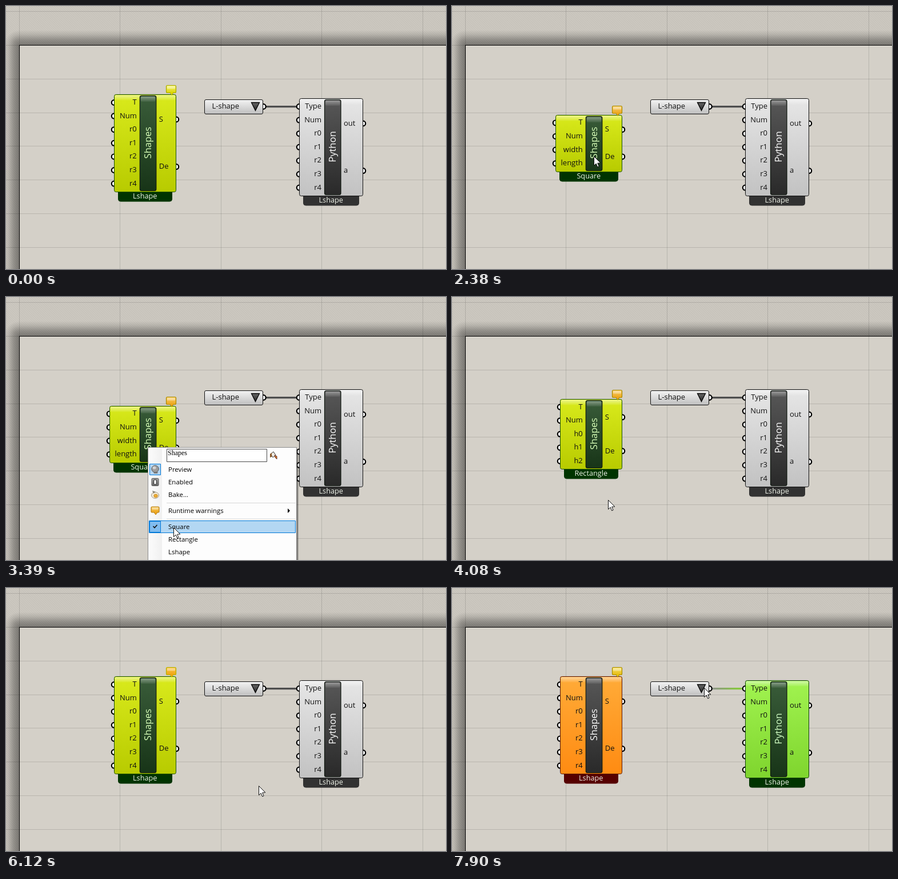
Animation, 770 px wide and 459 px high, one loop 8 s. Source, as an HTML page with a canvas:

```html
<!DOCTYPE html>
<html lang="en">
<head>
<meta charset="utf-8">
<title>Component shape menu</title>
<style>
html, body { margin: 0; width: 100%; height: 100%; overflow: hidden; background: #d4d0c8; }
canvas { display: block; }
</style>
</head>
<body>
<canvas id="stage" width="770" height="459"></canvas>
<script>
const W = 770, H = 459, LOOP = 8000;
const ctx = document.getElementById('stage').getContext('2d');
const SANS = '"Open Sans", "Noto Sans", sans-serif';
const SERIF = '"Liberation Serif", serif';

// Bursts of movement: start, end, number of steps
const BURSTS = [
  [140, 140, 1], [290, 830, 8], [980, 1760, 11], [1840, 2380, 8], [2700, 3460, 11],
  [3540, 3540, 1], [3770, 3770, 1], [3920, 4710, 11], [4800, 5100, 5], [5650, 5710, 2],
  [5960, 6730, 11], [6820, 6900, 2], [7050, 7050, 1], [7380, 7900, 8]
];
// Pointer path: time, x, y
const PATH = [
  [0, 661, 470], [139, 661, 470], [140, 661, 456], [290, 660, 446], [560, 430, 318],
  [830, 247, 236], [980, 247, 236], [1440, 307, 365], [1760, 308, 367], [1840, 308, 366],
  [2380, 248, 262], [2700, 248, 262], [3380, 293, 401], [3460, 297, 420], [3540, 296, 419],
  [3770, 287, 412], [3920, 287, 412], [4320, 251, 264], [4400, 251, 264], [4710, 293, 325],
  [4800, 301, 342], [5100, 326, 440], [5900, 326, 440], [6110, 441, 346], [6730, 566, 250],
  [6900, 577, 236], [7050, 567, 233], [7380, 606, 262], [7530, 757, 338], [7750, 520, 214],
  [7900, 441, 174]
];
// Context menus: open, close, x, y, checked item
const MENUS = [
  [980, 1840, 246, 235, 'Lshape'],
  [2700, 3920, 248, 262, 'Square'],
  [4400, 5650, 250, 263, 'Rectangle']
];
const ITEMS = [
  ['Preview', 39], ['Enabled', 61], ['Bake...', 83], ['Runtime warnings', 111],
  ['Square', 139], ['Rectangle', 161], ['Lshape', 183], ['Tshape', 205], ['Ushape', 227]
];
const RADII = ['r0', 'r1', 'r2', 'r3', 'r4'];
const SKINS = {
  lime: { body: ['#d9ea1c', '#b8cb00'], edge: '#1a5200', tag: ['#3a5d3a', '#173417'], foot: '#003400', text: '#d8ffb8' },
  orange: { body: ['#ffab38', '#ff8b12'], edge: '#5a1500', tag: ['#585858', '#292929'], foot: '#560000', text: '#fff' },
  grey: { body: ['#e6e6e6', '#c2c2c2'], edge: '#111', tag: ['#585858', '#292929'], foot: '#323232', text: '#fff' },
  green: { body: ['#a1f350', '#7fd52e'], edge: '#10400a', tag: ['#3a5d3a', '#173417'], foot: '#003400', text: '#d2ffc4' }
};
const BALLOONS = {
  yellow: ['#f4f27a', '#dcd600', '#a8a800'],
  orange: ['#f8cf6a', '#eda51c', '#a98b00'],
  mixed: ['#f8c44a', '#f0a412', '#b4b400'],
  gold: ['#f8e06a', '#e6bd10', '#a88d00']
};

// Holds each step of a burst; a step may start a little early
function stepTime(t) {
  let out = 0;
  for (const [a, b, n] of BURSTS) {
    if (t < a) break;
    if (t >= b) { out = b; continue; }
    const gap = (b - a) / (n - 1);
    out = a + Math.floor((t - a) / gap + 0.25) * gap;
  }
  return out;
}

function pointerAt(t) {
  const i = PATH.findIndex(p => p[0] > t);
  if (i < 0) return PATH[PATH.length - 1].slice(1);
  const [a, x, y] = PATH[i - 1], [b, u, v] = PATH[i];
  const k = (t - a) / (b - a);
  return [x + (u - x) * k, y + (v - y) * k];
}

function vert(y0, y1, colors) {
  const g = ctx.createLinearGradient(0, y0, 0, y1);
  colors.forEach((c, i) => g.addColorStop(i / (colors.length - 1), c));
  return g;
}

function box(x, y, w, h, r, fill, edge, line = 1) {
  ctx.beginPath();
  ctx.roundRect(x, y, w, h, r);
  if (fill) { ctx.fillStyle = fill; ctx.fill(); }
  if (edge) { ctx.strokeStyle = edge; ctx.lineWidth = line; ctx.stroke(); }
}

function shape(points, fill, edge, line = 1) {
  ctx.beginPath();
  points.forEach(([x, y]) => ctx.lineTo(x, y));
  ctx.closePath();
  if (fill) { ctx.fillStyle = fill; ctx.fill(); }
  if (edge) { ctx.strokeStyle = edge; ctx.lineWidth = line; ctx.stroke(); }
}

function disc(x, y, rx, ry, fill, edge, line = 1) {
  ctx.beginPath();
  ctx.ellipse(x, y, rx, ry, 0, 0, Math.PI * 2);
  ctx.fillStyle = fill;
  ctx.fill();
  if (edge) { ctx.strokeStyle = edge; ctx.lineWidth = line; ctx.stroke(); }
}

function label(text, x, y, size, color = '#111', align = 'left', font = SANS, weight = 400) {
  ctx.font = `${weight} ${size}px ${font}`;
  ctx.textAlign = align;
  ctx.fillStyle = color;
  ctx.fillText(text, x, y);
}

const grip = (x, y) => disc(x, y, 4.2, 4.4, '#fff', '#000', 2.2);

function hatch() {
  const tile = document.createElement('canvas');
  tile.width = tile.height = 4;
  const c = tile.getContext('2d');
  c.fillStyle = '#cac6be';
  c.fillRect(0, 0, 4, 4);
  for (let i = 0; i < 4; i++) {
    c.fillStyle = '#c5c1b9';
    c.fillRect(i, i, 1, 1);
    c.fillStyle = '#cdc9c1';
    c.fillRect((i + 2) % 4, i, 1, 1);
  }
  return ctx.createPattern(tile, 'repeat');
}
const HATCH = hatch();

function fade(g) {
  g.addColorStop(0, 'rgba(0,0,0,.4)');
  g.addColorStop(0.35, 'rgba(0,0,0,.28)');
  g.addColorStop(0.7, 'rgba(0,0,0,.1)');
  g.addColorStop(1, 'rgba(0,0,0,0)');
  return g;
}

function background() {
  ctx.fillStyle = HATCH;
  ctx.fillRect(0, 0, W, H);
  const X = 23, Y = 68, D = 26;
  ctx.fillStyle = fade(ctx.createLinearGradient(0, Y, 0, Y - D));
  ctx.fillRect(X, 0, W, Y);
  ctx.fillStyle = fade(ctx.createLinearGradient(X, 0, X - D, 0));
  ctx.fillRect(0, Y, X, H);
  ctx.fillStyle = fade(ctx.createRadialGradient(X, Y, 0, X, Y, D));
  ctx.fillRect(0, 0, X, Y);
  ctx.fillStyle = '#d4d0c8';
  ctx.fillRect(X, Y, W, H);
  ctx.fillStyle = 'rgba(0,0,0,.13)';
  for (let i = 0; i < 5; i++) ctx.fillRect(Math.round(22.6 + i * 176.6), 0, 1, H);
  for (let i = 0; i < 8; i++) ctx.fillRect(0, Math.round(9.2 + i * 58.8), W, 1);
  ctx.fillStyle = '#000';
  ctx.fillRect(X, Y, W, 1);
  ctx.fillRect(X, Y, 1, H);
}

function component(left, right, mid, tagX, name, foot, ins, outs, skin) {
  const PITCH = 23.6, n = ins.length;
  const h = Math.round(n * PITCH + 4.4), top = Math.round(mid - h / 2) + 0.5;
  const s = SKINS[skin], w = right - left;
  const inY = i => mid + (i - (n - 1) / 2) * PITCH;
  const outY = i => mid + (i - 0.5) * n * PITCH / 2;

  ins.forEach((_, i) => grip(left - 0.5, inY(i)));
  outs.forEach((_, i) => grip(right + 0.5, outY(i)));
  box(left + 7, top + h, w - 14, 16.5, [0, 0, 4, 4], s.foot, s.foot);
  label(foot, (left + right) / 2 - 0.3, top + h + 11.5, 12.7, '#f0f4ea', 'center');

  box(left, top, w, h, 3, vert(top, top + h, s.body), s.edge);
  box(left + 1, top + 1, w - 2, 9, 2, vert(top, top + 10, ['rgba(255,255,255,.55)', 'rgba(255,255,255,.06)']));

  box(tagX, top + 2, 28.5, h - 4, 3, vert(top, top + h, s.tag), '#101810', 1.2);
  box(tagX + 1.5, top + 3.5, 25.5, 9, 2, vert(top + 3, top + 13, ['rgba(255,255,255,.4)', 'rgba(255,255,255,.04)']));
  ctx.save();
  ctx.translate(tagX + 14, mid - 0.7);
  ctx.rotate(-Math.PI / 2);
  label(name, 0, 5.6, 16.5, s.text, 'center', SANS, 500);
  ctx.restore();

  ins.forEach((t, i) => label(t, tagX - 5.5, inY(i) + 3.5, 13, '#111', 'right'));
  outs.forEach((t, i) => label(t, tagX + 33.5, outY(i) + 3.7, 13));
  return top;
}

function balloon(x, y, w, h, [a, b, edge]) {
  const p = x + w / 2 + 1;
  shape([[p - 3, y + h], [p, y + h + 4], [p + 3, y + h]], b, edge);
  box(x, y, w, h, 2, vert(y, y + h, [a, b]), edge, 1.2);
  box(x + 1.5, y + 1.5, w - 3, h * 0.35, 1, 'rgba(255,255,255,.38)');
  ctx.fillStyle = b;
  ctx.fillRect(p - 2, y + h - 1, 4, 2);
}

function typeList(active) {
  ctx.lineWidth = 3.3;
  let wire = '#4d4d4d';
  if (active) {
    wire = ctx.createLinearGradient(455, 0, 500, 0);
    wire.addColorStop(0, '#8f948c');
    wire.addColorStop(1, '#86c73d');
  }
  ctx.strokeStyle = wire;
  ctx.beginPath();
  ctx.moveTo(454, 175.7);
  ctx.lineTo(509, 175.7);
  ctx.stroke();
  grip(450.5, 175.5);
  box(347.5, 163.5, 102, 25, 2.5, vert(163, 189, ['#f4f4f4', '#d9d9d9', '#bcbcbc']), '#111');
  label('L-shape', 360.5, 179.2, 13);
  shape([[429.5, 168.5], [443.5, 168.5], [436.5, 182.5]], vert(168, 183, ['#6a6a6a', '#222']), '#000', 1.3);
}

function bucket(x, y) {
  shape([[x - 5, y - 2], [x, y - 6], [x + 4, y], [x - 1, y + 4]], '#efe9df', '#333');
  shape([[x - 6, y - 2], [x - 3, y - 4], [x - 3, y + 3], [x - 6, y + 4]], '#8b5a2b');
  shape([[x + 2, y], [x + 6, y + 2], [x + 6, y + 7], [x + 3, y + 4]], '#d8781c', '#633');
}

function menuIcon(name, x, y) {
  if (name === 'Preview') {
    disc(x, y - 1, 6.2, 6, '#9d9d9d', '#555');
    disc(x - 1.5, y - 3, 3, 2.6, '#d2d2d2');
    box(x - 2.5, y + 4, 7, 3, 1, '#777');
  } else if (name === 'Enabled') {
    box(x - 6, y - 6.5, 12, 13, 1.5, vert(y - 7, y + 7, ['#aaa', '#666']), '#555');
    box(x - 2.5, y - 4, 5, 8, 1, '#e9e9e9', '#222');
  } else if (name === 'Bake...') {
    disc(x, y + 1, 6.5, 5.5, '#f3ead6', '#a39a88');
    disc(x + 1, y + 2, 3.2, 2.8, '#efae34', '#c98a20');
    shape([[x - 5, y - 7], [x + 1, y - 5], [x - 3, y - 2]], '#8d8778');
  } else if (name === 'Runtime warnings') {
    balloon(x - 7, y - 7, 14, 10, ['#f8cf6a', '#eda51c', '#b8811a']);
  }
}

function menu(x, y, checked, cursorY, alpha) {
  const w = 261, hot = ITEMS.find(([, dy]) => Math.abs(cursorY - y - dy) <= 11);
  ctx.save();
  ctx.globalAlpha = alpha;
  for (let i = 1; i < 4; i++) {
    ctx.fillStyle = 'rgba(0,0,0,.1)';
    ctx.fillRect(x + 4, y + 4, w - i, H);
  }
  ctx.fillStyle = 'rgba(0,0,0,.3)';
  ctx.fillRect(x + w, y + 4, 1, H);
  ctx.fillStyle = 'rgba(0,0,0,.12)';
  ctx.fillRect(x + w + 1, y + 5, 2, H);
  ctx.fillStyle = '#fdfdfd';
  ctx.fillRect(x, y, w, H);
  const strip = ctx.createLinearGradient(x, 0, x + 25, 0);
  strip.addColorStop(0, '#fcfcfc');
  strip.addColorStop(1, '#f0f0f0');
  ctx.fillStyle = strip;
  ctx.fillRect(x + 1, y + 2, 24, H);
  ctx.strokeStyle = '#8c8c8c';
  ctx.lineWidth = 1;
  ctx.strokeRect(x + 0.5, y + 0.5, w - 1, H);
  box(x + 33.5, y + 3.5, 175, 22, 0, '#fff', '#4a4a4a');
  label('Shapes', x + 35, y + 14, 12, '#000', 'left', SERIF);
  bucket(x + 220, y + 14);
  ctx.fillStyle = '#d7d7d7';
  ctx.fillRect(x + 33, y + 97, w - 35, 1);
  ctx.fillRect(x + 33, y + 125, w - 35, 1);

  for (const [name, dy] of ITEMS) {
    const cy = y + dy, isHot = hot && hot[0] === name;
    if (isHot) box(x + 2.5, cy - 10.5, 256, 21, 0, '#b3d7f3', '#0078d7');
    if (name === 'Preview' || name === checked)
      box(x + 3.5, cy - 9.5, 19, 19, 0, isHot ? '#80bcef' : '#b5d7f3', '#0078d7');
    menuIcon(name, x + 13, cy);
    if (name === checked) {
      ctx.strokeStyle = '#111';
      ctx.lineWidth = 1.6;
      ctx.beginPath();
      ctx.moveTo(x + 9.5, cy - 1);
      ctx.lineTo(x + 12, cy + 1.8);
      ctx.lineTo(x + 16.5, cy - 3.2);
      ctx.stroke();
    }
    label(name, x + 36, cy + 4, 11.45, '#000');
  }
  shape([[x + 245, y + 107], [x + 249, y + 111], [x + 245, y + 115]], '#000');
  ctx.restore();
}

function pointer(x, y) {
  const tip = [[0, 0], [0, 16], [3.7, 12.6], [6.2, 18.4], [8.6, 17.3], [6.2, 11.7], [11.4, 11.4]];
  shape(tip.map(([a, b]) => [x + a + 0.5, y + b + 0.5]), '#fff', '#111');
}

function draw(time) {
  const t = stepTime(time);
  const [px, py] = pointerAt(t);
  const picked = t >= 6820;
  let foot = 'Lshape', ins = RADII, left = 189.5, flag = 'yellow';
  if (t >= 1840 && t < 3920) {
    foot = 'Square'; ins = ['width', 'length']; left = 181.5; flag = 'orange';
  } else if (t >= 3920 && t < 5650) {
    foot = 'Rectangle'; ins = ['h0', 'h1', 'h2']; flag = 'orange';
  } else if (t >= 5650) {
    flag = picked ? 'gold' : 'mixed';
  }

  background();
  const top = component(left, 297.5, 239.3, 234.3, 'Shapes', foot, ['T', 'Num', ...ins], ['S', 'De'], picked ? 'orange' : 'lime');
  balloon(280.5, top - 16, 17, 13, BALLOONS[flag]);
  typeList(picked);
  component(513.5, 624.5, 246.3, 557.5, 'Python', 'Lshape', ['Type', 'Num', ...RADII], ['out', 'a'], picked ? 'green' : 'grey');

  const open = MENUS.find(([a, b]) => t >= a && t < b);
  if (open) menu(open[2], open[3], open[4], py, Math.min(1, 0.5 + (t - open[0]) / 150));
  pointer(Math.round(px), Math.round(py));
}

const start = performance.now();
function tick() {
  draw((performance.now() - start) % LOOP);
  requestAnimationFrame(tick);
}
tick();
</script>
</body>
</html>
```
